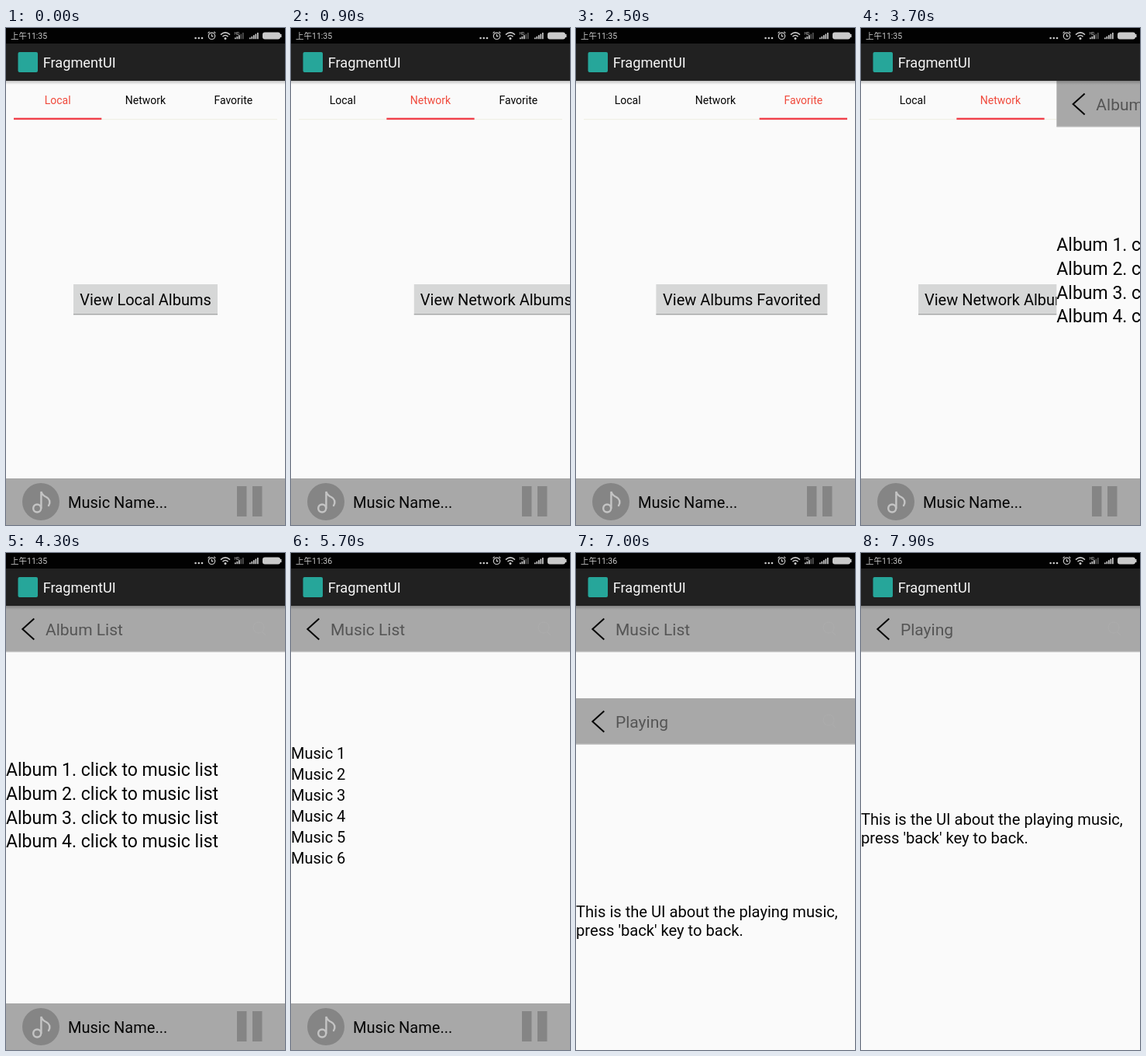
Animation, 360 px wide and 640 px high, one loop 8000 ms. Source, as an HTML page:

```html
<!DOCTYPE html>
<html lang="en">
<head>
<meta charset="utf-8">
<title>Music pager</title>
<style>
  html, body { margin: 0; width: 100%; height: 100%; overflow: hidden; background: #fafafa; }
  svg { display: block; width: 100%; height: 100%; }
  text { font-family: Roboto, "Noto Sans CJK SC", "Noto Sans CJK", sans-serif; white-space: pre; }
</style>
</head>
<body>
<svg id="stage" viewBox="0 0 360 640" xmlns="http://www.w3.org/2000/svg">
  <defs>
    <linearGradient id="shade" x2="0" y2="1">
      <stop stop-color="#000" stop-opacity=".22"/>
      <stop offset="1" stop-color="#000" stop-opacity="0"/>
    </linearGradient>
  </defs>
  <rect width="360" height="640" fill="#fafafa"/>
  <g id="tabs"><rect x="10" y="117" width="340" height="1.2" fill="#f0f0e6"/></g>
  <rect id="mark" y="115.7" width="113.3" height="2.4" fill="#f0404a"/>
  <g id="pager"></g>
  <g id="lists"></g>

  <g id="player">
    <rect y="580" width="360" height="60" fill="#a8a8a8"/>
    <circle cx="45" cy="610" r="24" fill="#858585"/>
    <g fill="none" stroke="#c4c4c4" stroke-width="2.4" stroke-linecap="round">
      <circle cx="40.2" cy="618.5" r="5"/>
      <path d="M45.4 618V597Q47 602 52 604Q59 608 55 615"/>
    </g>
    <text x="80" y="618" font-size="20" fill="#050505">Music Name...</text>
    <path d="M298 590h12.5v39H298zM318 590h12.5v39H318z" fill="#858585"/>
  </g>
  <g id="playing"></g>

  <rect y="68" width="360" height="5" fill="url(#shade)"/>
  <rect width="360" height="20" fill="#020202"/>
  <rect y="20" width="360" height="48" fill="#212121"/>
  <rect x="15.5" y="31" width="25.5" height="26" rx="2" fill="#26a69a"/>
  <text x="47.7" y="51" font-size="18.2" fill="#f5f5f5">FragmentUI</text>

  <g fill="#cacaca">
    <text id="clock" x="6" y="14" font-size="10.5"></text>
    <circle cx="244.6" cy="13" r="1.3"/><circle cx="248.8" cy="13" r="1.3"/><circle cx="253" cy="13" r="1.3"/>
    <circle cx="283" cy="13.5" r="1.5"/>
    <text x="294.5" y="8.5" font-size="5">HD</text>
    <rect x="331" y="5.5" width="23" height="9" rx="3"/><rect x="354" y="8" width="1.5" height="4"/>
    <g id="bars"></g>
  </g>
  <g fill="none" stroke="#cacaca" stroke-width="1.2">
    <circle cx="265.5" cy="10.3" r="4.2"/>
    <path d="M265.5 7.8v2.8h2M260.6 6.6l2-1.8M270.4 6.6l-2-1.8"/>
    <path d="M277 8.6q6-5.4 12 0M279.5 11.1q3.5-3.2 7 0" stroke-width="1.5"/>
  </g>
</svg>
<script>
const $ = id => document.getElementById(id);
const LOOP = 8000, W = 360, TOP = 68, TAB = 340 / 3;
const INK = '#050505', ACCENT = '#f04a3c';

function add(parent, tag, attrs, text) {
  const el = document.createElementNS('http://www.w3.org/2000/svg', tag);
  for (const k in attrs) el.setAttribute(k, attrs[k]);
  if (text) el.textContent = text;
  parent.appendChild(el);
  return el;
}
const label = (p, x, y, size, text, fill = INK, anchor = 'start') =>
  add(p, 'text', { x, y, 'font-size': size, fill, 'text-anchor': anchor }, text);
const rect = (p, x, y, width, height, fill) => add(p, 'rect', { x, y, width, height, fill });
const move = (el, x, y) => el.setAttribute('transform', `translate(${x} ${y})`);

const tabs = ['Local', 'Network', 'Favorite'].map((name, i) =>
  label($('tabs'), 10 + TAB * (i + .5), 98, 14, name, INK, 'middle'));

[['View Local Albums', 186], ['View Network Albums', 212], ['View Albums Favorited', 221]]
  .forEach(([name, w], i) => {
    const mid = W * (i + .5);
    rect($('pager'), mid - w / 2, 330, w, 39, '#d6d7d7');
    rect($('pager'), mid - w / 2, 368, w, 1.4, '#a4a5a5');
    label($('pager'), mid, 357, 20, name, INK, 'middle');
  });

// A full screen with a header bar and lines of text
function screen(parent, title, lines, size, y, step, height) {
  const g = add(parent, 'g', {});
  rect(g, 0, TOP, W, height, '#fafafa');
  rect(g, 0, TOP, W, 59, '#a8a8a8');
  rect(g, 0, 126.5, W, 1.2, '#c4c4c4');
  add(g, 'path', { d: 'M36.3 84.5L21.3 98L36.3 111.5', fill: 'none', stroke: INK, 'stroke-width': 2 });
  add(g, 'path', { d: 'M331 102l4 4M333 96a7 7 0 1 0-14 0a7 7 0 1 0 14 0', fill: 'none', stroke: '#adadad' });
  label(g, 51, 106, 21, title, '#555');
  lines.forEach((line, i) => label(g, 0, y + step * i, size, line));
  return g;
}
const rows = (n, f) => Array.from({ length: n }, (_, i) => f(i + 1));
const albums = screen($('lists'), 'Album List', rows(4, i => `Album ${i}. click to music list`), 23, 287, 30.8, 512);
const songs = screen($('lists'), 'Music List', rows(6, i => `Music ${i}`), 20, 265, 27, 512);
const playing = screen($('playing'), 'Playing',
  ['This is the UI about the playing music,', "press 'back' key to back."], 20.15, 350, 24, 572);

for (const x of [295, 314]) {
  for (let i = 0; i < 5; i++) {
    const h = 1.8 + i * 1.6;
    const bar = rect($('bars'), x + i * 2.5, 14.2 - h, 1.7, h, '#cacaca');
    if (x < 300 && i > 2) bar.setAttribute('opacity', .4);
  }
}

const clamp = x => Math.min(1, Math.max(0, x));
const part = (t, a, b) => clamp((t - a) / (b - a));
const smooth = x => .5 - Math.cos(Math.PI * x) / 2;

// The finger drags half a page, then the page settles
const swipes = [
  { from: 500, release: 800, end: 1255, dir: 1 },
  { from: 1400, release: 1650, end: 2000, dir: 1 },
  { from: 2250, release: 2688, end: 3000, dir: -1 }
];
const swipe = (t, s) => t < s.release
  ? .5 * part(t, s.from, s.release) ** 3
  : 1 - .5 * (1 - part(t, s.release, s.end)) ** 3;

function draw(t) {
  let page = 0, chosen = 0;
  for (const s of swipes) {
    page += s.dir * swipe(t, s);
    if (t >= s.release) chosen += s.dir;
  }
  move($('pager'), -W * page, 0);
  tabs.forEach((tab, i) => tab.setAttribute('fill', i === chosen ? ACCENT : INK));
  $('mark').setAttribute('x', 10 + TAB * chosen);

  move(albums, W * (1 - smooth(part(t, 3480, 4080))), 0);
  move(songs, W * (1 - smooth(part(t, 4780, 5380))), 0);
  move(playing, 0, 572 * (1 - smooth(part(t, 6582, 7182))));
  $('clock').textContent = t < 5000 ? '上午11:35' : '上午11:36';
}

const start = performance.now();
function tick() {
  draw((performance.now() - start) % LOOP);
  requestAnimationFrame(tick);
}
tick();
</script>
</body>
</html>
```
